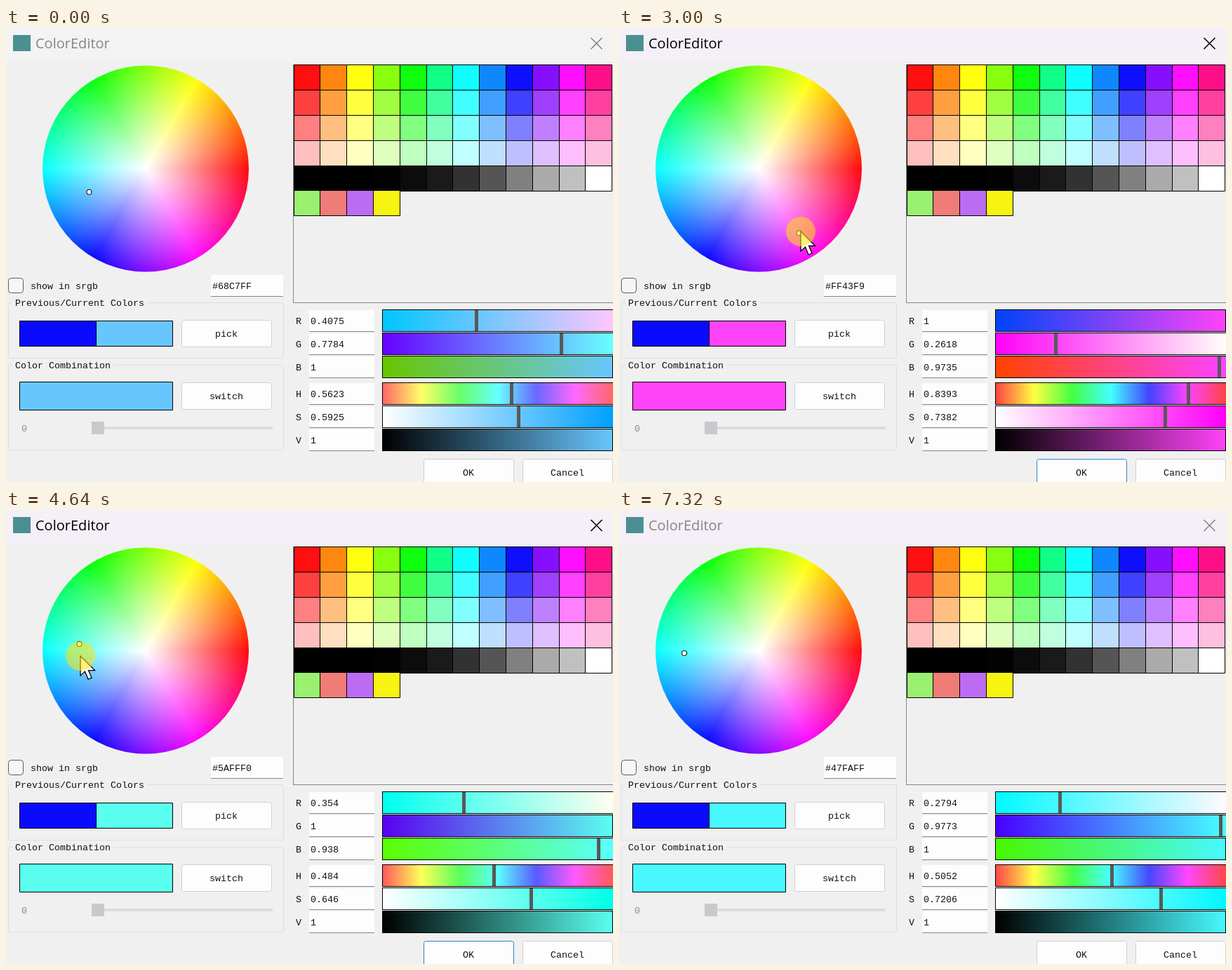
Recreate the animation shown at these times as an HTML page with a canvas. Size 865x647 px, loop 7.4 s.

```html
<!DOCTYPE html>
<html lang="en">
<head>
<meta charset="utf-8">
<title>ColorEditor</title>
<style>
  html, body { margin: 0; width: 100%; height: 100%; overflow: hidden; background: #f0f0f0; }
  canvas { display: block; }
</style>
</head>
<body>
<canvas id="stage" width="865" height="647"></canvas>
<script>
const ctx = document.getElementById('stage').getContext('2d');
const LOOP = 7400, STEP = 40;
const CX = 199, CY = 200.5, RADIUS = 147;
const MONO = '13.33px "Liberation Mono", "DejaVu Sans Mono", monospace';
const TITLE = '20px "Open Sans", "Noto Sans", sans-serif';

// Dragged colour: time, hue in turns (unwrapped), saturation
const drag = [
  [2080, .527, .642], [2320, .64194, .673], [2360, .65, .675], [2800, .8, .76],
  [2880, .8, .76], [3000, .83932, .7382], [3040, .844, .733], [3600, 1.15, .55],
  [3680, 1.15, .55], [4080, 1.29812, .6796], [4120, 1.3, .682], [4200, 1.31, .715],
  [4400, 1.31, .715], [4800, 1.6, .6], [5120, 1.9, .25], [5200, 1.9262, .2662],
  [5240, 1.9406, .27], [5520, 2.22, .1], [5840, 2.505245, .7206]
];
// Free pointer: time, x, y
const enter = [[1480, 19, 239], [1800, 106, 216]];
const leave = [[5960, 93, 204], [6120, 146, 242], [6600, 505, 568]];

function at(keys, t) {
  let i = 1;
  while (i < keys.length - 1 && t > keys[i][0]) i++;
  const [a, b] = [keys[i - 1], keys[i]];
  const k = Math.min(1, Math.max(0, (t - a[0]) / (b[0] - a[0])));
  return [a[1] + (b[1] - a[1]) * k, a[2] + (b[2] - a[2]) * k];
}

function hsv(h, s, v) {
  return [5, 3, 1].map(n => {
    const k = (n + h * 6) % 6;
    return v - v * s * Math.max(0, Math.min(k, 4 - k, 1));
  });
}
const css = c => `rgb(${c.map(v => Math.round(v * 255))})`;
const hex = c => '#' + c.map(v => Math.min(255, Math.floor(v * 256))
  .toString(16).padStart(2, '0')).join('').toUpperCase();

function wheelPoint([h, s]) {
  const a = h * 2 * Math.PI;
  return [CX + Math.cos(a) * s * RADIUS, CY - Math.sin(a) * s * RADIUS];
}

function fill(x, y, w, h, color) {
  ctx.fillStyle = color;
  ctx.fillRect(x, y, w, h);
}

function frame(x, y, w, h, color, inside, r = 0) {
  ctx.beginPath();
  ctx.roundRect(x + .5, y + .5, w - 1, h - 1, r);
  if (inside) { ctx.fillStyle = inside; ctx.fill(); }
  ctx.strokeStyle = color;
  ctx.lineWidth = 1;
  ctx.stroke();
}

function disc(x, y, r, color, edge) {
  ctx.beginPath();
  ctx.arc(x, y, r, 0, 7);
  ctx.fillStyle = color;
  ctx.fill();
  if (edge) { ctx.strokeStyle = edge; ctx.lineWidth = 1.2; ctx.stroke(); }
}

function label(text, x, y, color = '#111', align = 'left', font = MONO) {
  ctx.font = font;
  ctx.textAlign = align;
  ctx.textBaseline = 'middle';
  ctx.fillStyle = color;
  ctx.fillText(text, x, y);
}

function field(text, x, y, w) {
  fill(x, y, w, 31, '#fdfdfd');
  fill(x, y + 30, w, 1, '#868686');
  label(text, x + 2, y + 16);
}

function button(text, x, y, edge = '#d0d0d0') {
  frame(x, y, 129, 39, edge, '#fdfdfd', 3);
  label(text, x + 64, y + 20, '#111', 'center');
}

function group(title, y, h) {
  frame(3, y, 393, h, '#dedede', null, 2);
  fill(9, y - 4, title.length * 8 + 8, 9, '#f0f0f0');
  label(title, 13, y + 1);
}

function stops(gradient, colors) {
  colors.forEach((c, i) => gradient.addColorStop(i / (colors.length - 1), css(c)));
  return gradient;
}

function slider(name, value, y, colors) {
  label(name, 413, y + 16);
  field(String(+value.toFixed(4)), 432, y, 93);
  fill(536, y - 1, 329, 32, '#000');
  fill(537, y, 328, 30, stops(ctx.createLinearGradient(537, 0, 865, 0), colors));
  if (value > .9999) fill(864, y, 1, 30, '#000');
  else fill(Math.round(537 + value * 328) - 3, y, 5, 30, '#595959');
}

const hues = s => [0, 1, 2, 3, 4, 5, 6].map(i => hsv(i / 6, s, 1));
const hueRing = stops(ctx.createConicGradient(0, CX, CY), hues(.96).reverse());
const whiteCore = ctx.createRadialGradient(CX, CY, 0, CX, CY, RADIUS);
whiteCore.addColorStop(0, '#fff');
whiteCore.addColorStop(1, 'rgba(255,255,255,0)');

const greys = [0, 0, 0, 2, 12, 26, 50, 85, 128, 170, 192, 255];
const saved = ['#9af070', '#f07c78', '#bc6cf2', '#f8f412'];

function palette() {
  fill(409, 52, 1, 340, '#868686');
  fill(409, 391, 456, 1, '#868686');
  const edge = i => Math.round(409.5 + i * 37.8);
  const cell = (col, row, color) => {
    const x = edge(col), y = Math.round(52.4 + row * 35.8);
    frame(x, y, edge(col + 1) - x + 1, 37, '#000', color);
  };
  for (let i = 0; i < 12; i++) {
    for (let row = 0; row < 4; row++)
      cell(i, row, css(hsv(i / 12, [.94, .75, .5, .25][row], 1)));
    cell(i, 4, `rgb(${greys[i]},${greys[i]},${greys[i]})`);
  }
  saved.forEach((c, i) => cell(i, 5, c));
}

function titleBar(t, active) {
  const ink = active ? '#000' : '#858585';
  fill(0, 0, 865, 48, t < 2080 ? '#f3f3f3' : '#f5eff8');
  fill(10, 10, 25, 23, '#4b8f93');
  label('ColorEditor', 42, 23.5, ink, 'left', TITLE);
  ctx.beginPath();
  ctx.moveTo(833.5, 14); ctx.lineTo(849.5, 30);
  ctx.moveTo(849.5, 14); ctx.lineTo(833.5, 30);
  ctx.strokeStyle = ink;
  ctx.lineWidth = 1.6;
  ctx.stroke();
}

function leftPanel(rgb) {
  frame(3, 356, 22, 22, '#5a5a5a', '#f6f6f6', 4);
  label('show in srgb', 35, 368);
  field(hex(rgb), 292, 352, 103);

  group('Previous/Current Colors', 391, 80);
  frame(19, 417, 110, 37, '#000', '#0a0aff');
  frame(128, 417, 110, 37, '#000', css(rgb));
  button('pick', 250, 416);

  group('Color Combination', 480, 122);
  frame(19, 504, 219, 41, '#000', css(rgb));
  button('switch', 250, 505);
  label('0', 22, 571, '#8c8c8c');
  fill(122, 568, 258, 4, '#dcdcdc');
  fill(122, 561, 18, 18, '#cac7cd');
}

function pointer(x, y) {
  const shape = [[0, 0], [0, 28], [6.5, 22], [11, 33], [16, 31], [11.5, 20.5], [20.5, 20.5]];
  ctx.beginPath();
  shape.forEach(([dx, dy]) => ctx.lineTo(x + dx, y + dy));
  ctx.closePath();
  ctx.fillStyle = '#fff';
  ctx.fill();
  ctx.strokeStyle = '#000';
  ctx.lineWidth = 1.3;
  ctx.stroke();
}

function draw(t) {
  const active = t >= 2080 && t < 7320;
  const pressed = t >= 2080 && t < 6000;
  const [turn, s] = t < 2080 ? [.56233, .5925] : at(drag, t);
  const h = turn % 1, rgb = hsv(h, s, 1);

  fill(0, 0, 865, 647, '#f0f0f0');
  titleBar(t, active);
  disc(CX, CY, RADIUS, hueRing);
  disc(CX, CY, RADIUS, whiteCore);
  palette();
  leftPanel(rgb);

  ['R', 'G', 'B'].forEach((name, i) => {
    const ends = [0, 1].map(v => rgb.map((c, j) => j === i ? v : c));
    slider(name, rgb[i], 402 + 33 * i, ends);
  });
  slider('H', h, 506, hues(s));
  slider('S', s, 539, [[1, 1, 1], hsv(h, 1, 1)]);
  slider('V', 1, 572, [[0, 0, 0], rgb]);
  button('OK', 595, 614, active ? '#2a84d0' : '#d0d0d0');
  button('Cancel', 736, 614);

  disc(...wheelPoint([h, s]), 3.5, '#fff', '#222');
  if (t < 1480 || t >= 6640) return;
  // The marker trails the pointer by one step
  const tip = pressed ? wheelPoint(at(drag, t + STEP)) : at(t < 2080 ? enter : leave, t);
  pointer(...tip);
  if (pressed) disc(...tip, 21, 'rgba(255,228,10,.55)');
}

function tick() {
  const t = performance.now() % LOOP;
  draw(Math.floor(t / STEP) * STEP);
  requestAnimationFrame(tick);
}
tick();
</script>
</body>
</html>
```
